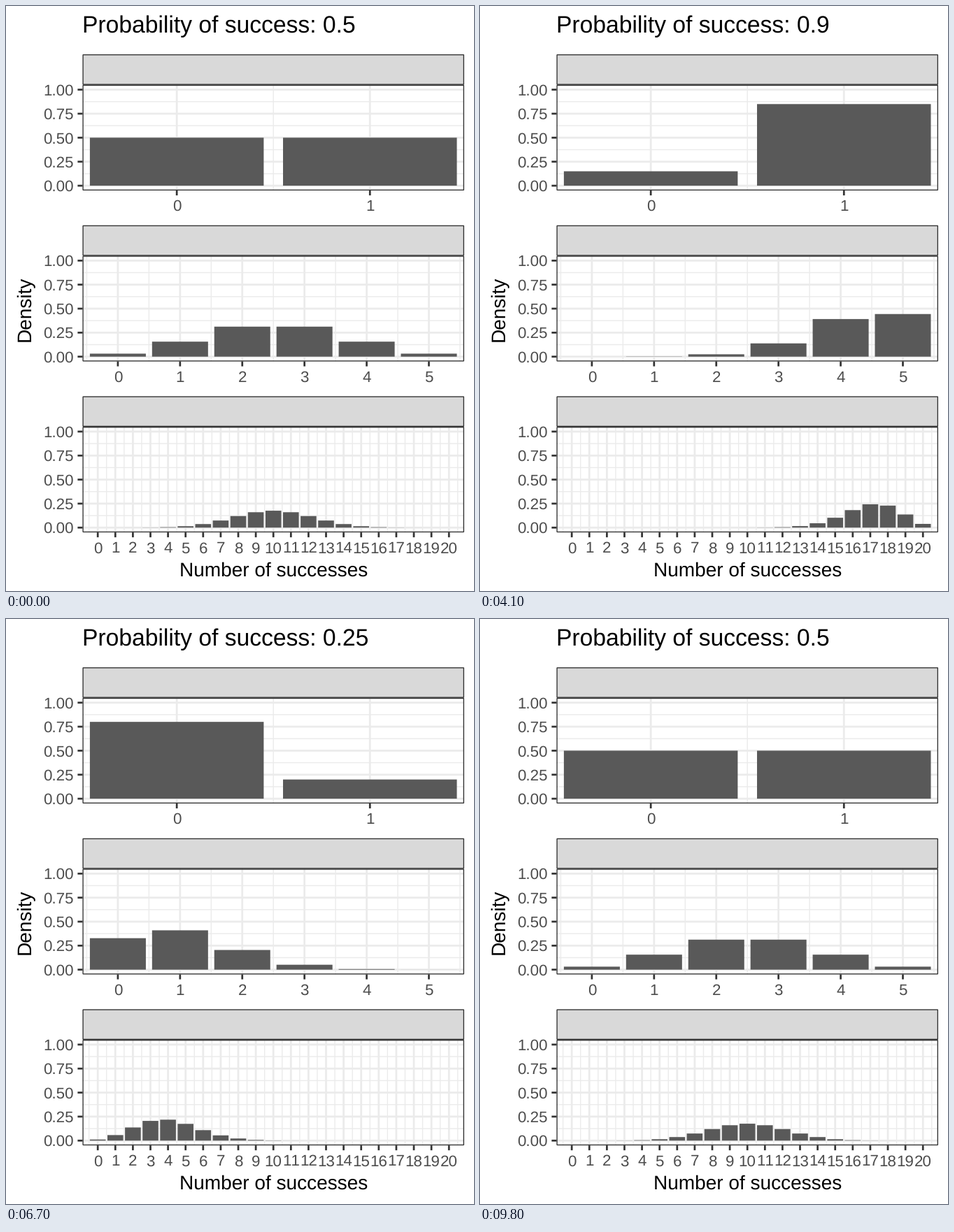
These frames come from a looping animation (669x837 px, 10 s). A matplotlib script:

```python
from math import comb

import matplotlib.pyplot as plt
from matplotlib.animation import FuncAnimation
from matplotlib.collections import LineCollection
from matplotlib.patches import Rectangle

plt.rcParams.update({
    "font.family": "Liberation Sans",
    "text.hinting": "none",
    "text.kerning_factor": 6,
})

W, H, DPI = 669, 837, 64
PT = 72 / DPI                       # points per pixel
BASE = 28                           # base font size in pixels
LINE = BASE / 22 * 2.134            # line weight in pixels
LEFT, RIGHT = 109.4, 655.0
ZERO, UNIT, STEP = 257.1, 137.4, 244.6
STRIP = 43.7
TICK = 7
INK, GRID, BAR = "#333333", "#EBEBEB", "#595959"
TRIALS = (1, 5, 20)

# Success probabilities in twentieths: up, down and back to the middle
STATES = [*range(10, 21), *range(20, -1, -1), *range(0, 11)]

fig = plt.figure(figsize=(W / DPI, H / DPI), dpi=DPI, facecolor="white")
ax = fig.add_axes([0, 0, 1, 1])
ax.set_xlim(0, W)
ax.set_ylim(H, 0)
ax.axis("off")


def text(x, y, s, size, color="black", ha="center", **kw):
    return ax.text(x, y, s, fontsize=size * PT, color=color, ha=ha,
                   va="baseline", **kw)


def lines(segments, width, color, z):
    ax.add_collection(LineCollection(segments, linewidths=width * PT,
                                     colors=color, capstyle="butt",
                                     snap=False, zorder=z), autolim=False)


def box(top, bottom, fill, z):
    """Rectangle whose border lies fully inside its edges."""
    w = LINE / 2
    ax.add_patch(Rectangle((LEFT + w / 2, top + w / 2),
                           RIGHT - LEFT - w, bottom - top - w,
                           facecolor=fill, edgecolor=INK, linewidth=w * PT,
                           joinstyle="miter", snap=False, zorder=z))


def panel(n, zero):
    """Draw one facet and return its bars."""
    top, bottom = zero - 1.05 * UNIT, zero + 0.05 * UNIT
    pad = (RIGHT - LEFT) * 0.02 / 1.04
    unit = (RIGHT - LEFT - 2 * pad) / (n + 0.9)

    def px(k):
        return LEFT + pad + (k + 0.45) * unit

    def py(v):
        return zero - v * UNIT

    def vertical(values):
        return [[(px(k), top), (px(k), bottom)] for k in values]

    def horizontal(values):
        return [[(LEFT, py(v)), (RIGHT, py(v))] for v in values]

    ks = range(n + 1)
    levels = [i / 4 for i in range(5)]
    halves = [k - 0.5 for k in range(n + 2) if LEFT < px(k - 0.5) < RIGHT]
    lines(vertical(halves) + horizontal([v + 0.125 for v in levels[:4]]),
          LINE / 2, GRID, 1)
    lines(vertical(ks) + horizontal(levels), LINE, GRID, 2)

    name = f"{n} trial" + ("s" if n > 1 else "")
    box(top - STRIP, top, "#D9D9D9", 4)
    box(top, bottom, "none", 4)
    text((LEFT + RIGHT) / 2, top - 14.2, name, 0.8 * BASE, "#1A1A1A")

    lines([[(px(k), bottom), (px(k), bottom + TICK)] for k in ks]
          + [[(LEFT - TICK, py(v)), (LEFT, py(v))] for v in levels],
          LINE, INK, 3)
    for k in ks:
        text(px(k), bottom + 29.3, str(k), 0.8 * BASE, "#4D4D4D")
    for v in levels:
        text(LEFT - 12.6, py(v) + 7.9, f"{v:.2f}", 0.8 * BASE, "#4D4D4D",
             ha="right")

    bars = [Rectangle((px(k - 0.45), zero), 0.9 * unit, 0, facecolor=BAR,
                      linewidth=0, snap=False, zorder=3) for k in ks]
    for bar in bars:
        ax.add_patch(bar)
    return bars


panels = [(n, ZERO + i * STEP, panel(n, ZERO + i * STEP))
          for i, n in enumerate(TRIALS)]
title = text(LEFT - 0.2, 38, "", 1.2 * BASE, ha="left")
text((LEFT + RIGHT) / 2, 816, "Number of successes", BASE)
text(34.5, 433, "Density", BASE, rotation=90, rotation_mode="anchor")


def timing(i):
    """State index at frame i, and whether the bars already lead the title."""
    if i < 44:
        return i // 3, i % 3 == 2 and i < 42
    state = 15 + (i - 44) // 2
    return state, i % 2 == 1 and state < len(STATES) - 1


def update(i):
    state, lead = timing(i)
    title.set_text(f"Probability of success: {STATES[state] / 20:g}")
    p = STATES[state + lead] / 20
    for n, zero, bars in panels:
        for k, bar in enumerate(bars):
            h = comb(n, k) * p**k * (1 - p)**(n - k) * UNIT
            bar.set_y(zero - h)
            bar.set_height(h)
    return []


anim = FuncAnimation(fig, update, frames=100, interval=100, repeat=True,
                     repeat_delay=0, blit=False)
plt.show()
```
